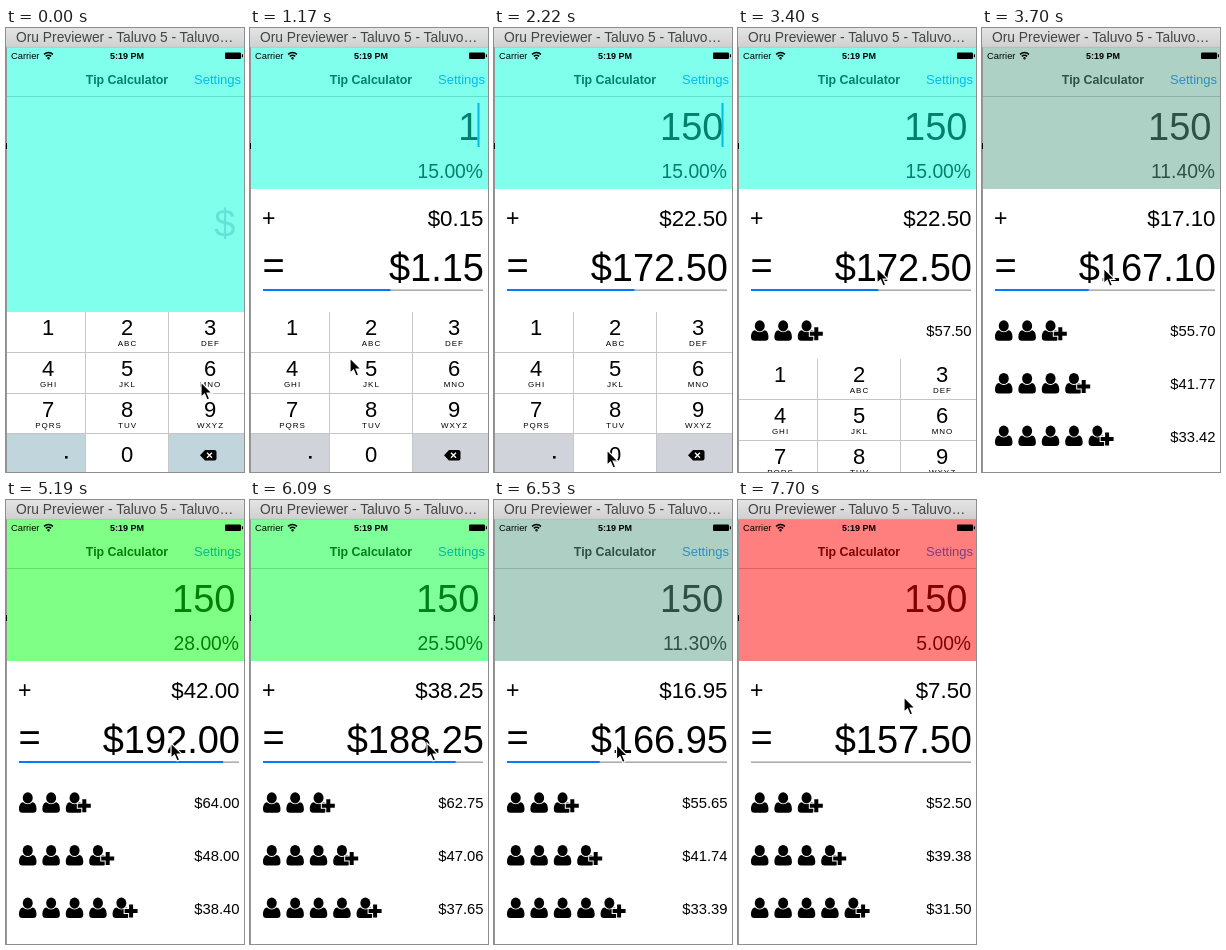
An HTML page that plays this animation: 238x444 px, repeating every 8 s.

```html
<!DOCTYPE html>
<html lang="en">
<head>
<meta charset="utf-8">
<title>Tip Calculator</title>
<style>
html, body { margin: 0; width: 100%; height: 100%; overflow: hidden; background: #fff; }
svg { display: block; width: 100%; height: 100%; font-family: "Liberation Sans", Arial, sans-serif; }
.r { text-anchor: end; }
.m { text-anchor: middle; }
.b { font-weight: bold; }
</style>
</head>
<body>
<svg viewBox="0 0 238 444">
  <defs>
    <linearGradient id="bar" x2="0" y2="1">
      <stop stop-color="#e4e4e4"/><stop offset="1" stop-color="#d0d0d0"/>
    </linearGradient>
    <g id="user">
      <path d="M4 10C1 10.5 0 13.5 0 17Q0 20.5 3.5 20.5H14Q17.5 20.5 17.5 17C17.5 13.5 16.5 10.5 13.5 10Q8.7 14 4 10Z"/>
      <ellipse cx="8.75" cy="5.6" rx="5" ry="5.6"/>
    </g>
    <path id="plus" d="M16.5 7h4v4.5h4.5v4h-4.5v4.5h-4v-4.5h-4.5v-4h4.5z" stroke="#fff" stroke-width="2" paint-order="stroke"/>
  </defs>
  <rect width="238" height="444" fill="#fff"/>

  <text class="m b" x="121" y="56" font-size="12.4">Tip Calculator</text>
  <text class="r" x="235" y="56" font-size="13" fill="#007aff">Settings</text>
  <path d="M0 68.5h238" stroke="#000" stroke-opacity=".25"/>
  <text id="amount" class="r" x="229.5" font-size="38"/>
  <rect id="caret" x="227.5" y="75" width="2" height="44" fill="#007aff"/>
  <text id="pct" class="r" x="233" font-size="19.3"/>
  <rect id="tint" y="19" width="238" fill-opacity=".5"/>

  <text x="5" y="31" font-size="9.3">Carrier</text>
  <g fill="none" stroke="#000" stroke-width="1.5">
    <path d="M38 26.3q4.5-3.6 9 0M39.8 28.4q2.7-2.2 5.4 0"/>
    <circle cx="42.5" cy="30.2" r=".5"/>
  </g>
  <text class="m b" x="121" y="31" font-size="9">5:19 PM</text>
  <rect x="219" y="24.5" width="16" height="6.5" rx="1"/>
  <rect x="235.8" y="26.3" width="1.2" height="3"/>

  <g id="panel">
    <text x="12" y="198" font-size="23">+</text>
    <text x="12.5" y="251" font-size="38">=</text>
    <text id="tip" class="r" x="233.5" y="198" font-size="22.3"/>
    <text id="total" class="r" x="234" y="253" font-size="38"/>
    <rect x="13" y="261.5" width="220" height="1.3" fill="#999"/>
    <rect id="fill" x="13" y="261" height="2" fill="#007aff"/>
    <g id="rows"></g>
  </g>

  <g id="pad"></g>

  <path d="M.5 19v425" stroke="#969696"/>
  <path d="M0 115h1v6h-1z"/>
  <rect width="238" height="19" fill="url(#bar)"/>
  <path d="M0 19.3h238" stroke="#b0b0b0" stroke-width=".6"/>
  <text x="10" y="14" font-size="13.8" fill="#444">Oru Previewer - Taluvo 5 - Taluvo…</text>
  <path id="cursor" d="M0 0V15.2L3.5 12L6.1 18L8.7 16.9L6.2 11.1H11Z" stroke="#fff" stroke-width="1.2"/>
</svg>
<script>
const LOOP = 8000;
const $ = id => document.getElementById(id);
const set = (id, attrs) => { for (const k in attrs) $(id).setAttribute(k, attrs[k]); };
const clamp = v => Math.max(0, Math.min(1, v));
const lerp = (a, b, f) => a + (b - a) * f;
const ease = f => f * f * (3 - 2 * f);
const money = v => "$" + v.toFixed(2);

const SHORT = [0, 3, 6, 18, 21, 29, 42, 45, 50, 51];
const ticks = [0];
for (let i = 0; i < 52; i++) ticks.push(ticks[i] + (SHORT.includes(i) ? 140 : 150));
const snap = t => ticks.filter(v => v <= t).pop();

// Rows of [time, ...values], interpolated linearly.
function track(keys, t) {
  const i = keys.findIndex(k => k[0] > t);
  if (i < 0) return keys[keys.length - 1].slice(1);
  const a = keys[i - 1], b = keys[i], f = (t - a[0]) / (b[0] - a[0]);
  return a.slice(1).map((v, j) => lerp(v, b[j + 1], f));
}

const POINTER = [
  [0, 195, 354], [590, 48, 305], [740, 45, 303], [890, 48, 306], [1170, 100, 330],
  [1320, 113, 342], [1620, 114, 345], [1920, 113, 415], [2220, 113, 422], [2520, 115, 412],
  [3100, 139, 240], [3550, 139, 240], [4150, 70, 241], [4290, 70, 241], [4590, 77, 239],
  [5190, 165, 243], [5340, 180, 243], [5490, 192, 243], [5640, 198, 243], [5940, 188, 243],
  [6090, 177, 243], [6970, 68, 246], [7270, 64, 245], [7560, 115, 222], [7700, 166, 197]
];
// The rate follows the drag on a logarithmic scale.
const RATE = [
  [0, 15], [3550, 15], [4150, 5], [4290, 5], [4590, 5.6], [5190, 28],
  [5340, 30], [5790, 30], [6090, 25.5], [6970, 5]
].map(([t, p]) => [t, Math.log(p)]);
const PRESSES = [[590, 740, "1"], [1470, 1600, "5"], [1920, 2060, "0"]];

const LETTERS = ["", "ABC", "DEF", "GHI", "JKL", "MNO", "PQRS", "TUV", "WXYZ"];
const COLS = [1, 80, 163, 238], ROWS = [284, 325, 366, 406, 444], MID = [42, 121, 204];

function key(label, sub, c, r) {
  const x = COLS[c], y = ROWS[r];
  const base = y + (r === 3 ? 28 : 22.5);
  return `<rect id="k${label}" x="${x}" y="${y}" width="${COLS[c + 1] - x}" height="${ROWS[r + 1] - y}" fill="#fff"/>
    <text class="m" x="${MID[c]}" y="${base}" font-size="22">${label}</text>
    <text class="m" x="${MID[c] + .5}" y="${y + 34}" font-size="8" letter-spacing="1">${sub}</text>`;
}

function build() {
  let pad = '<rect id="dock" x="1" y="406" width="237" height="38"/>';
  LETTERS.forEach((s, i) => pad += key(i + 1, s, i % 3, Math.floor(i / 3)));
  pad += key(0, "", 1, 3);
  pad += `<path d="M1 324.5h237M1 365.5h237M1 405.5h237M79.5 284v160M162.5 284v160" stroke="#c4c6ca" fill="none"/>
    <rect x="59" y="428" width="2.6" height="2.6"/>
    <path d="M194 427.3l5-5.3h9.5q2 0 2 2v6.6q0 2-2 2h-9.5z"/>
    <path d="M201 424.8l5 5m0-5l-5 5" stroke="#fff" stroke-width="1.3"/>`;
  $("pad").innerHTML = pad;

  let rows = "";
  for (let n = 3; n < 6; n++) {
    const y = 292.3 + (n - 3) * 52.6;
    for (let i = 0; i < n; i++) rows += `<use href="#user" x="${13 + i * 23.4}" y="${y}"/>`;
    rows += `<use href="#plus" x="${13 + (n - 1) * 23.4}" y="${y}"/>
      <text id="split${n}" class="r" x="233.5" y="${y + 16}" font-size="14.8"/>`;
  }
  $("rows").innerHTML = rows;
}

function tintColor(p) {
  const low = clamp((p - 5) / 10), high = clamp((p - 15) / 14);
  const c = [255 * (1 - low), 255 * low, 217 * low * (1 - high)];
  return `rgb(${c.map(Math.round)})`;
}

function draw(time) {
  const t = snap(time);
  const bill = t < 740 ? 0 : t < 1600 ? 1 : t < 2060 ? 15 : 150;
  const rate = Math.round(Math.exp(track(RATE, t)[0]) * 10) / 10;
  const tip = bill * rate / 100, total = bill + tip;
  const open = ease(clamp((t - 690) / 340));
  const edge = lerp(444, 161, open), dy = edge - 161;

  $("amount").textContent = bill || "$";
  set("amount", { y: lerp(209, 112, open), fill: bill ? "#000" : "#c7c7cd" });
  set("caret", { visibility: t >= 1030 && t < 3400 ? "visible" : "hidden" });
  $("pct").textContent = rate.toFixed(2) + "%";
  set("pct", { y: 149.5 + dy });
  set("tint", { height: edge - 19, fill: tintColor(rate) });

  set("panel", { transform: `translate(0 ${dy})` });
  $("tip").textContent = money(tip);
  $("total").textContent = money(total);
  set("fill", { width: Math.max(0, 122.8 * Math.log(rate / 5) - 7.5) });
  for (let n = 3; n < 6; n++) $("split" + n).textContent = money(total / n);

  const drop = track([[0, 0], [3250, 0], [3400, 47], [3550, 136], [3700, 162]], t)[0];
  set("pad", { transform: `translate(0 ${drop})` });
  set("dock", { fill: open < .5 ? "#c1d5dc" : "#d0d3d9" });
  for (const [a, b, k] of PRESSES) set("k" + k, { fill: t >= a && t < b ? "#d0d3d9" : "#fff" });

  const [x, y] = track(POINTER, t);
  set("cursor", { transform: `translate(${x} ${y})` });
}

build();
const start = performance.now();
function tick() {
  draw((performance.now() - start) % LOOP);
  requestAnimationFrame(tick);
}
tick();
</script>
</body>
</html>
```
